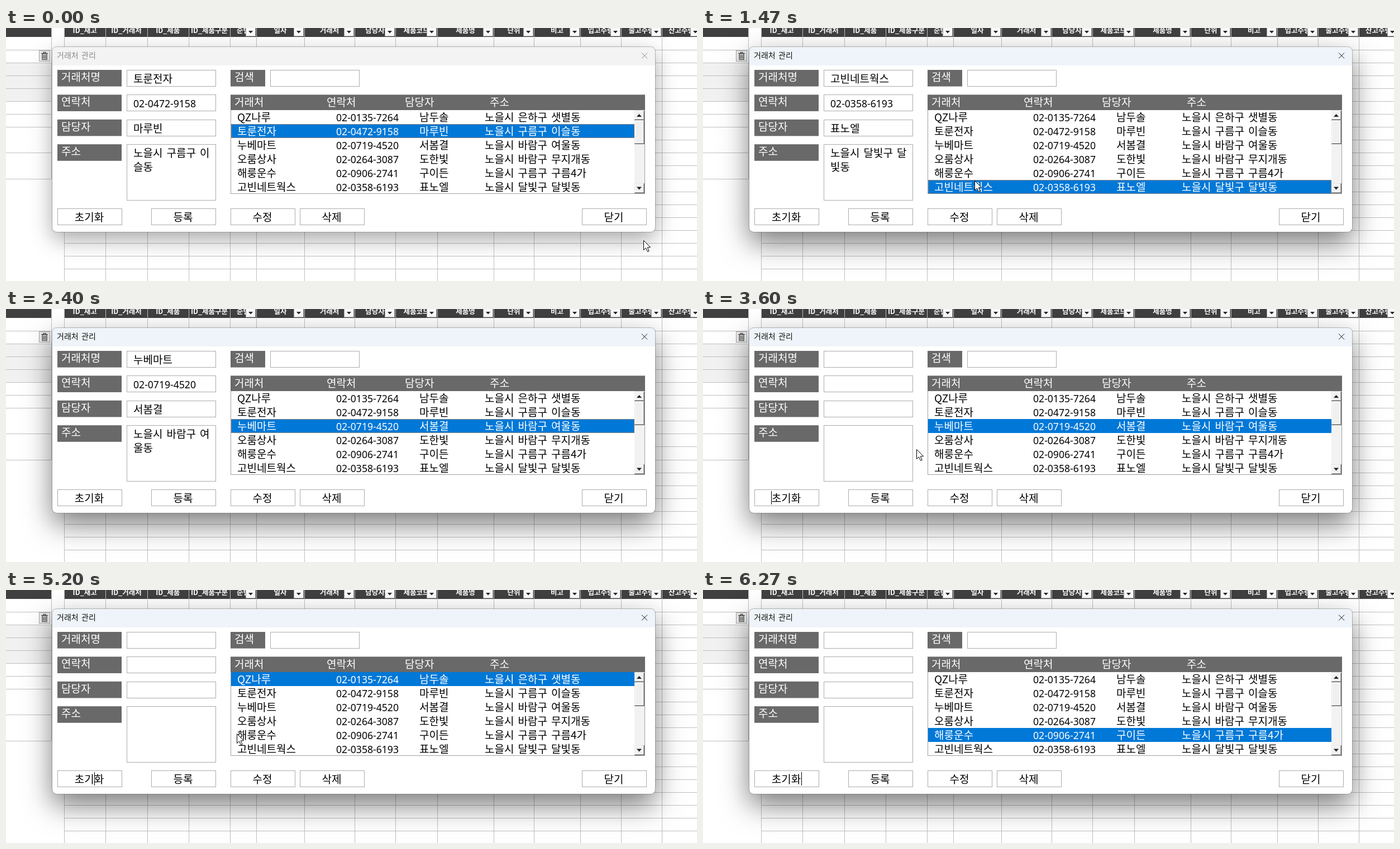
Write an HTML page with a canvas that moves like this. It is 1237 px wide and 453 px high and loops after 6.54 s.

```html
<!DOCTYPE html>
<html lang="ko">
<head>
<meta charset="utf-8">
<title>거래처 관리</title>
<style>
html, body { margin: 0; width: 100%; height: 100%; overflow: hidden; background: #fff; }
canvas { display: block; }
</style>
</head>
<body>
<canvas id="stage" width="1237" height="453"></canvas>
<script>
const W = 1237, H = 453, LOOP = 6540, TICK = 1000 / 15;
const ctx = document.getElementById('stage').getContext('2d');
const HANGUL = '"Noto Sans CJK KR", "Noto Sans CJK", "Noto Sans CJK JP", sans-serif';
const BODY = '19px ' + HANGUL;
const DIGITS = '17.6px "Noto Sans", sans-serif';

const GRID_PITCH = 23.05;
const ROW_TOP = 147.4, ROW_PITCH = 24.85;
const CHAR = 17.9;
const fieldY = i => 75 + 44.4 * i;

const idHeadings = ['ID_재고', 'ID_거래처', 'ID_제품', 'ID_제품구분'];
const widths = { 순번: 47, 일자: 86, 거래처: 90, 담당자: 73, 제품코드: 75, 제품명: 101,
  단위: 72, 비고: 83, 입고수량: 73, 출고수량: 73, 산고수량: 70 };

const fields = ['거래처명', '연락처', '담당자', '주소'];
const buttons = { 초기화: 92, 등록: 260, 수정: 402, 삭제: 526, 닫기: 1031 };
const listHeads = { 거래처: 409, 연락처: 574, 담당자: 714, 주소: 866 };

const clients = [
  ['QZ나루', '02-0135-7264', '남두솔', '노을시 은하구 샛별동'],
  ['토룬전자', '02-0472-9158', '마루빈', '노을시 구름구 이슬동'],
  ['누베마트', '02-0719-4520', '서봄결', '노을시 바람구 여울동'],
  ['오룸상사', '02-0264-3087', '도한빛', '노을시 바람구 무지개동'],
  ['해룽운수', '02-0906-2741', '구이든', '노을시 구름구 구름4가'],
  ['고빈네트웍스', '02-0358-6193', '표노엘', '노을시 달빛구 달빛동']
];

// Pointer strokes in ticks; a click acts on the place where its stroke ends
const moves = [
  { from: 0, to: 5, x: 486, y: 470, bow: 60 },
  { from: 7, to: 11, x: 260, y: 470, bow: 25 },
  { from: 12, to: 20, x: 486, y: 273, click: 21 },
  { from: 23, to: 26.5, x: 486, y: 208, click: 27 },
  { from: 28, to: 32, x: 114, y: 394 },
  { from: 32, to: 36, x: 66, y: 470 },
  { from: 38.7, to: 40, x: 129, y: 328 },
  { from: 43, to: 48, x: 129, y: 343, click: 51 },
  { from: 50, to: 58.7, x: 486, y: 161, bow: -46, click: 61 },
  { from: 62, to: 71, x: 158, y: 354, click: 73 },
  { from: 72, to: 83, x: 480, y: 258, bow: 35, click: 83 },
  { from: 83, to: 90, x: 182, y: 345, click: 91 },
  { from: 91, to: 94, x: 141, y: 470 }
];

function fill(x, y, w, h, color) {
  ctx.fillStyle = color;
  ctx.fillRect(x, y, w, h);
}

function frame(x, y, w, h, color, back = '#fff') {
  fill(x, y, w, h, color);
  fill(x + 1, y + 1, w - 2, h - 2, back);
}

function text(s, x, y, color = '#000', font = BODY, align = 'left') {
  ctx.font = font;
  ctx.fillStyle = color;
  ctx.textAlign = align;
  ctx.wordSpacing = font === BODY ? '2.8px' : '0px';
  ctx.fillText(s, x, y);
}

function poly(points, color) {
  ctx.beginPath();
  points.forEach(([x, y]) => ctx.lineTo(x, y));
  ctx.closePath();
  ctx.fillStyle = color;
  ctx.fill();
}

function triangle(x, y, half, height) {
  poly([[x - half, y], [x + half, y], [x, y + height]], '#222');
}

function drawTrash() {
  frame(59, 40, 20, 20, '#a6a6a6', '#ececec');
  ctx.strokeStyle = '#444';
  ctx.lineWidth = 1.2;
  ctx.strokeRect(65, 46, 8, 10.5);
  ctx.strokeRect(67, 43.5, 4, 2);
  fill(63, 45, 12, 1, '#444');
  for (const x of [67, 69, 71]) fill(x - 0.5, 48, 1, 7, '#444');
}

function drawHeading(s, left, width) {
  text(s, left + width / 2, 9, '#fff', 'bold 12.5px ' + HANGUL, 'center');
}

function drawSheet() {
  const line = '#bfbfbf', dark = '#404040';
  fill(0, 0, W, H, '#fff');
  fill(0, 63, 81, 68, '#f1f1f1');
  for (let i = 0; i < 18; i++) {
    const y = Math.round(39 + GRID_PITCH * i);
    fill(104, y, W - 104, 1, line);
    if (i < 7 || i === 8 || i === 10) fill(0, y, 81, 1, line);
  }
  fill(81, 0, 1, 270, line);
  fill(0, 0, 81, 16, dark);
  fill(104, 0, W - 104, 16, dark);
  drawTrash();

  let x = 104;
  for (const s of idHeadings) {
    fill(Math.round(x), 0, 1, H, line);
    drawHeading(s, x, 74.3);
    x += 74.3;
  }
  x = Math.round(x);
  for (const [s, w] of Object.entries(widths)) {
    fill(x, 0, 1, H, line);
    drawHeading(s, x, w);
    x += w;
    frame(x - 19, -2, 18, 17, '#a6a6a6', '#fbfbfb');
    triangle(x - 10, 5, 4, 4.5);
  }
}

function drawWindow(active) {
  ctx.beginPath();
  ctx.roundRect(83, 34, 1079, 331, 8);
  ctx.save();
  ctx.shadowColor = `rgba(0,0,0,${active ? 0.52 : 0.35})`;
  ctx.shadowBlur = active ? 50 : 38;
  ctx.shadowOffsetY = active ? 20 : 13;
  ctx.fillStyle = '#fff';
  ctx.fill();
  ctx.restore();
  ctx.save();
  ctx.clip();
  fill(83, 34, 1079, 33, active ? '#eef4f9' : '#f3f3f3');
  ctx.restore();
  ctx.beginPath();
  ctx.roundRect(82.5, 33.5, 1080, 332, 8);
  ctx.strokeStyle = 'rgba(110,110,110,0.45)';
  ctx.lineWidth = 1;
  ctx.stroke();

  const ink = active ? '#111' : '#8a8a8a';
  text('거래처', 91, 53.5, ink, '14px ' + HANGUL);
  text('관리', 135, 53.5, ink, '14px ' + HANGUL);
  ctx.strokeStyle = ink;
  ctx.beginPath();
  for (const d of [-5, 5]) {
    ctx.moveTo(1143 - d, 44.5);
    ctx.lineTo(1143 + d, 54.5);
  }
  ctx.stroke();
}

function drawLabel(s, x, y, w) {
  fill(x, y, w, 29.6, '#696969');
  text(s, x + 7, y + 20, '#fff');
}

function drawForm(client, caret) {
  fields.forEach((s, i) => {
    const y = fieldY(i);
    drawLabel(s, 92, y, 115);
    frame(216, Math.round(y), 160, i === 3 ? 101 : 30, '#ababab');
  });
  drawLabel('검색', 402, fieldY(0), 62);
  frame(473, fieldY(0), 160, 30, '#ababab');
  for (const [s, x] of Object.entries(buttons)) {
    frame(x, 323, 116, 30, '#ababab');
    text(s, x + 57, 346, '#000', BODY, 'center');
  }
  if (caret) {
    fill(caret, 326, 1, 24, '#000');
    return;
  }
  const [name, phone, person, address] = client;
  text(name, 228, fieldY(0) + 23);
  text(phone, 228, fieldY(1) + 23, '#000', DIGITS);
  text(person, 228, fieldY(2) + 23);
  text(address.slice(0, 9), 228, fieldY(3) + 23);
  text(address.slice(9), 228, fieldY(3) + 23 + ROW_PITCH);
}

function raised(y, h) {
  fill(1125, y, 18, h, '#696969');
  fill(1125, y, 17, h - 1, '#e3e3e3');
  fill(1126, y + 1, 16, h - 2, '#a0a0a0');
  frame(1126, y + 1, 15, h - 3, '#fff', '#f0f0f0');
}

function drawList(selected, focused) {
  frame(402, 146, 742, 151, '#a0a0a0');
  fill(402, fieldY(1), 742, 147 - fieldY(1), '#696969');
  for (const [s, x] of Object.entries(listHeads)) text(s, x, 139.5, '#fff');

  clients.forEach(([name, phone, person, address], i) => {
    const top = Math.round(ROW_TOP + ROW_PITCH * i), base = top + 20;
    const on = i === selected, ink = on ? '#fff' : '#000';
    if (on) fill(403, top, 722, 25, '#0078d7');
    if (on && focused) {
      ctx.strokeStyle = '#ff8728';
      ctx.lineWidth = 1;
      ctx.setLineDash([1, 1]);
      ctx.strokeRect(403.5, top + 0.5, 721, 24);
      ctx.setLineDash([]);
    }
    text(name, 414, base, ink);
    text(phone, 591, base, ink, DIGITS);
    text(person, 740, base, ink);
    text(address, 857, base, ink);
  });

  fill(1125, 147, 18, 149, '#f2f2f2');
  raised(148, 17);
  raised(165, 43);
  raised(278, 18);
  triangle(1133.5, 159, 4.5, -5);
  triangle(1133.5, 284.5, 4.5, 5);
}

function pointerAt(tick) {
  let x = 1141, y = 380;
  for (const m of moves) {
    if (tick < m.from) break;
    const p = Math.min(1, (tick - m.from) / (m.to - m.from));
    const e = m.y > H ? p : 1 - (1 - p) ** 2;
    x += (m.x - x) * e;
    y += (m.y - y) * e - (m.bow || 0) * Math.sin(Math.PI * e);
  }
  return [Math.round(x), Math.round(y)];
}

function dialogAt(tick) {
  const state = { row: 1, caret: 0, active: false };
  for (const { click, x, y } of moves) {
    if (!(click <= tick)) continue;
    state.active = true;
    const inList = y < 297;
    if (inList) state.row = Math.floor((y - ROW_TOP) / ROW_PITCH);
    state.caret = inList ? 0 : Math.round(122 + CHAR * Math.round((x - 122) / CHAR));
  }
  return state;
}

function overText(x, y) {
  const inside = (l, t, w, h) => x >= l && x <= l + w && y >= t && y <= t + h;
  return Object.values(buttons).some(l => inside(l, 323, 116, 32)) ||
    fields.some((s, i) => inside(216, fieldY(i), 160, i === 3 ? 101 : 30));
}

function drawPointer(x, y) {
  if (overText(x, y)) {
    fill(x, y - 10, 1, 21, '#000');
    for (const dy of [-11, 11]) {
      fill(x - 3, y + dy, 3, 1, '#000');
      fill(x + 1, y + dy, 3, 1, '#000');
    }
    return;
  }
  const shape = [[0, 0], [0, 17], [4, 13.3], [7, 20], [9.6, 18.9], [6.8, 12.4], [12, 12.2]];
  poly(shape.map(([dx, dy]) => [x + dx + 0.5, y + dy + 0.5]), '#fff');
  ctx.strokeStyle = '#000';
  ctx.lineWidth = 1;
  ctx.stroke();
}

function render(ms) {
  const tick = Math.floor((ms % LOOP) / TICK + 0.01);
  const { row, caret, active } = dialogAt(tick);
  drawSheet();
  drawWindow(active);
  drawForm(clients[row], caret);
  drawList(row, !caret);
  drawPointer(...pointerAt(tick));
}

const start = performance.now();
function loop() {
  render(performance.now() - start);
  requestAnimationFrame(loop);
}
loop();
</script>
</body>
</html>
```
